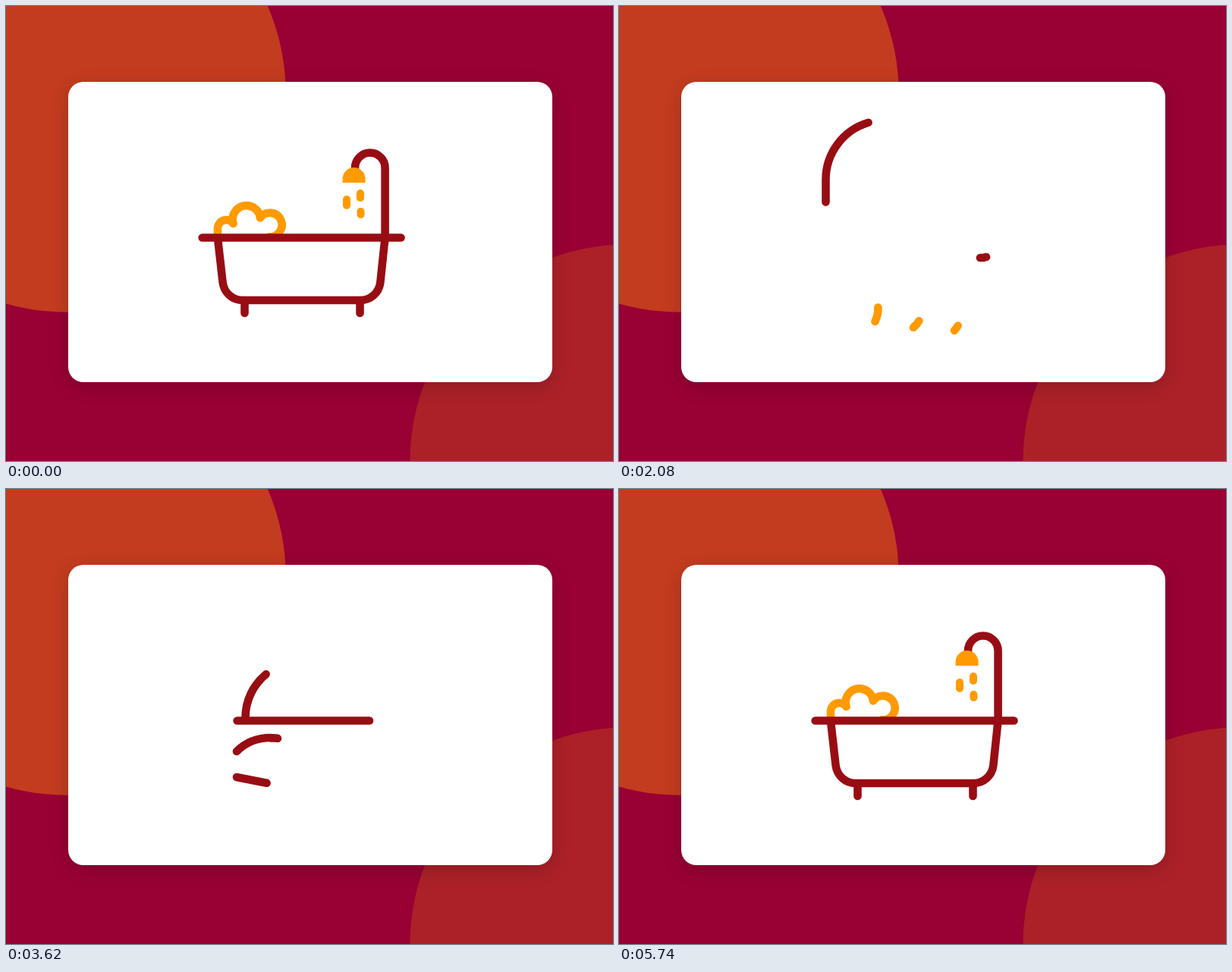
An HTML page for the animation above (5760 ms loop, 800 px wide and 600 px high).

```html
<!DOCTYPE html>
<html lang="en">
<head>
<meta charset="utf-8">
<title>Room comforts</title>
<style>
html, body { margin: 0; width: 100%; height: 100%; overflow: hidden; background: #903; }
svg { position: absolute; left: 0; top: 0; }
.card { position: absolute; left: 82px; top: 100px; width: 638px; height: 396px;
  border-radius: 20px; background: #fff; box-shadow: 0 6px 24px rgba(0, 0, 0, .18); }
.line { fill: none; stroke-width: 10.6; stroke-linecap: round; stroke-linejoin: round; }
</style>
</head>
<body>
<svg width="800" height="600">
  <circle cx="80" cy="115" r="288.7" fill="#c33c1f"/>
  <circle cx="818" cy="600" r="285.5" fill="#ac2128"/>
</svg>
<div class="card"></div>
<svg id="icon" width="800" height="600"></svg>
<script>
const LOOP = 5760, RED = '#980d13', GOLD = '#ff9a00';
const icon = document.getElementById('icon');
const parts = [];

const wrap = t => (t + LOOP) % LOOP;
const mix = (a, b, u) => a + (b - a) * u;
function ease(u) {
  u = Math.min(1, Math.max(0, u));
  return u * u * (3 - 2 * u);
}

function add(tag, attrs) {
  const el = document.createElementNS('http://www.w3.org/2000/svg', tag);
  for (const k in attrs) el.setAttribute(k, attrs[k]);
  return icon.appendChild(el);
}

// Progress of arriving and of leaving; the span may cross the loop's end.
function phase(t, { on, off, enter = 400, leave = 400 }) {
  const s = wrap(t - on);
  return [s / enter, (s - wrap(off - on)) / leave];
}

// A line that draws itself up to its end, with its tail settling at `rest`,
// and later shrinks to the point `meet`, both as fractions of the path.
function stroke(d, color, time, { rest = 0, meet = 1 } = {}) {
  const el = add('path', { d, stroke: color, pathLength: 1, class: 'line' });
  parts.push(t => {
    const [i, o] = phase(t, time), out = ease(o);
    const a = mix(rest * ease(i / .857), meet, out);
    const b = mix(ease(i), meet, out);
    el.style.display = b - a > .001 ? '' : 'none';
    el.setAttribute('stroke-dasharray', `${Math.max(0, b - a)} 2`);
    el.setAttribute('stroke-dashoffset', -a);
  });
  return el;
}

// A filled shape that fades in and out.
function fade(tag, attrs, time) {
  const el = add(tag, { fill: GOLD, ...attrs });
  parts.push(t => {
    const [i, o] = phase(t, time);
    el.setAttribute('opacity', ease(i) * (1 - ease(o)));
  });
}
const pill = (x, y, width, height, rx, time) => fade('rect', { x, y, width, height, rx }, time);

// Bath
stroke('M279 301V293.5a11.3 11.3 0 0 1 20.6-6.5A18.2 18.2 0 1 1 335 279.5A15.8 15.8 0 1 1 347 304.4',
  GOLD, { on: 4900, off: 20 });
stroke('M460 217V213.5a19.8 20 0 0 1 39.6 0V305', RED, { on: 4520, off: 60 });
stroke('M279 306L285.7 365A26.5 26.5 0 0 0 312 388H467A26.5 26.5 0 0 0 493.3 365L499.5 306',
  RED, { on: 4520, off: 60, enter: 480, leave: 520 });
for (const x of [314.5, 466.5])
  stroke(`M${x} 388V405`, RED, { on: 4600, off: 40, leave: 260 }, { meet: 0 });
fade('path', { d: 'M443.6 233V228a15 15 0 0 1 30 0V233Z' }, { on: 4900, off: 40, leave: 220 });
[[444, 250, 18], [462, 242, 16], [462.5, 266, 14]].forEach(([x, y, h], i) =>
  pill(x, y, 10, h, 5, { on: 5240 + i * 90, off: 20 + i * 30, enter: 280, leave: 200 }));

// Air conditioner
stroke('M499.5 306V310a22 22 0 0 1-22 22H295.5a22 22 0 0 1-22-22V263.7a22 22 0 0 1 22-22H477.5a22 22 0 0 1 22 22V306',
  RED, { on: 620, off: 1560, leave: 560 }, { meet: .054 });
pill(349, 258.5, 60, 16.5, 8.2, { on: 860, off: 1640, enter: 180, leave: 240 });
[
  'M335 353C326 357 329 369 334 378S346 398 337.5 416',
  'M392 368C384 374 385 382 391 390S404 410 388 424',
  'M448 351C438 357 439 370 446 382S456 412 442 428'
].forEach((d, i) =>
  stroke(d, GOLD, { on: 785 + i * 22, off: 1729 - i * 43, enter: 360, leave: 540 }));

// Bed
stroke('M555.5 240V229a78.5 78.5 0 0 0-78.5-78.5H351a78.5 78.5 0 0 0-78.5 78.5V368a26.5 26.5 0 0 0 26.5 26.5H390',
  RED, { on: 1787, off: 2964, enter: 500, leave: 480 }, { rest: .564, meet: .575 });
stroke('M390 394.5H481a26.5 26.5 0 0 0 26.5-26.5V290', RED, { on: 2300, off: 2898, leave: 480 });
stroke('M507.5 305.5H272.5', RED, { on: 2300, off: 2942, leave: 480 }, { meet: 0 });
pill(292.5, 271.5, 54.5, 20, 8, { on: 2500, off: 2980, enter: 220, leave: 300 });

// Serving dome on a hand
stroke('M315.5 305V302a75 75 0 0 1 150 0V305', RED, { on: 3480, off: 4097, leave: 380 });
stroke('M399 204a11 12 0 1 1-22 0a11 12 0 1 1 22 0', GOLD, { on: 3640, off: 4060, leave: 200 });
stroke('M304 346C318 332 334 328 349 328', RED, { on: 3480, off: 4060, enter: 120, leave: 200 });
stroke('M349.5 328.5Q357 328 364 330.3L389.5 338.2L412.5 337.5a10.7 10.7 0 0 1 0 21.4L375 361.2',
  RED, { on: 3560, off: 4280 });
stroke('M304 380L370 393Q384 396 396 389L472 341', RED, { on: 3500, off: 4060, leave: 200 });

// One bar is the plate, then widens to the bath's rim, then narrows to the vent
const barTime = { on: 3250, off: 1580, leave: 380 };
const bar = stroke('', RED, barTime);
parts.push(t => {
  const s = wrap(t - barTime.on);
  const wide = ease((s - 1050) / 600), slim = ease((s - 3090) / 460);
  const left = mix(mix(302, 258.7, wide), 292.5, slim);
  const right = mix(mix(479, 520.5, wide), 475.5, slim);
  bar.setAttribute('d', `M${right} 305.5H${left}`);
});

const began = performance.now();
function draw(now) {
  const t = Math.max(0, now - began) % LOOP;
  parts.forEach(p => p(t));
  requestAnimationFrame(draw);
}
draw(began);
</script>
</body>
</html>
```
